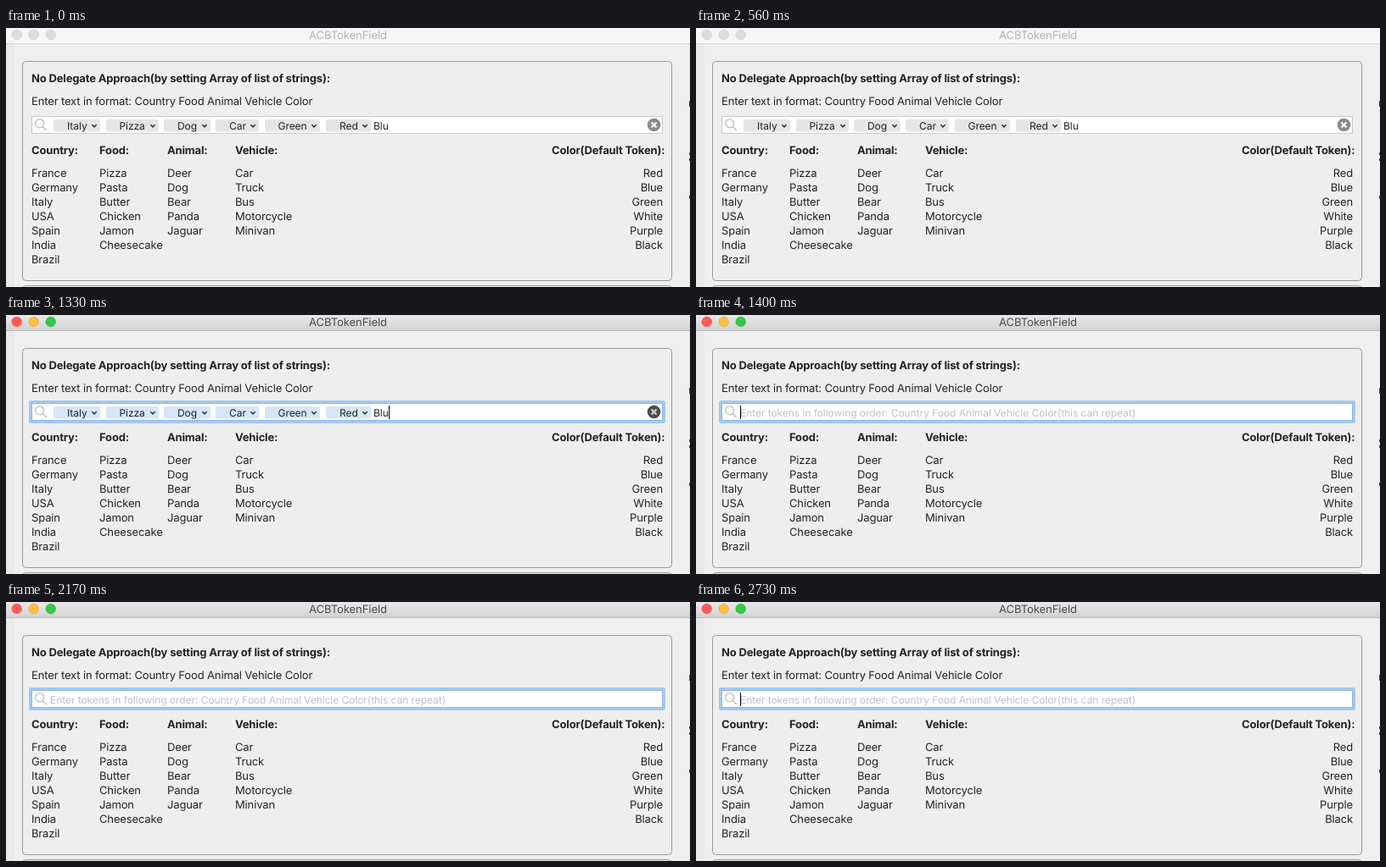
Animation, 806 px wide and 306 px high, one loop 2870 ms. Source, as an HTML page:

```html
<!DOCTYPE html>
<html lang="en">
<head>
<meta charset="utf-8">
<title>Token field</title>
<style>
  html, body { margin: 0; width: 100%; height: 100%; overflow: hidden; background: #ececec; }
  svg { display: block; }
  text {
    font: 13px Inter, Roboto, sans-serif;
    letter-spacing: -.14px;
    fill: #232323;
    text-rendering: geometricPrecision;
    white-space: pre;
  }
  .bold { font-weight: 700; letter-spacing: -.16px; }
  .title { letter-spacing: -.04px; text-anchor: middle; fill: #4a4a4a; }
  .right { text-anchor: end; }
  .small { font-size: 12px; letter-spacing: -.05px; }
  .hint { fill: #c1c1c1; }
  .idle .title { fill: #b3b3b3; }
  .lamp { stroke-width: .6; }
  .chip { fill: #d5e6f7; }
  .chevron { fill: none; stroke: #333; stroke-width: 1.5; }

  /* One loop: focus at 1260 ms, cleared at 1400 ms, then a blinking caret */
  .idle, .focus, .tokens, .empty, .chip, .caret { animation: 2870ms step-end infinite; }
  .idle { animation-name: leave; }
  .focus { animation-name: enter; }
  .tokens { animation-name: clear; }
  .empty { animation-name: reveal; }
  .chip { animation-name: tint; }
  .caret { animation-name: blink; }
  @keyframes leave { 0% { visibility: visible } 43.902%, 100% { visibility: hidden } }
  @keyframes enter { 0% { visibility: hidden } 43.902%, 100% { visibility: visible } }
  @keyframes clear { 0% { opacity: 1 } 48.78%, 100% { opacity: 0 } }
  @keyframes reveal { 0% { opacity: 0 } 48.78%, 100% { opacity: 1 } }
  @keyframes tint { 0% { fill: #e5e5e5 } 43.902%, 100% { fill: #d5e6f7 } }
  @keyframes blink {
    0% { opacity: 1 }
    68.293% { opacity: .4 }
    70.732% { opacity: 0 }
    90.244% { opacity: .25 }
    92.683% { opacity: .65 }
    95.122%, 100% { opacity: 1 }
  }
</style>
</head>
<body>
<svg id="stage" width="806" height="306" viewBox="0 0 806 306">
  <defs>
    <linearGradient id="bar" x2="0" y2="1">
      <stop stop-color="#e8e8e8"/><stop offset="1" stop-color="#d3d3d3"/>
    </linearGradient>
    <path id="cross" d="M-3-3 3 3M3-3-3 3" fill="none" stroke-width="2"/>
  </defs>

  <rect width="806" height="306" fill="#e9e9e9"/>
  <rect x="10" y="19" width="795" height="287" fill="#efefef"/>
  <path d="M805.5 86v7M805.5 147v3M805.5 154v3M805.5 198v4" stroke="#444"/>
  <g fill="#eeeeee" stroke="#989898">
    <rect x="19.5" y="39.5" width="765" height="259" rx="4"/>
    <rect x="19.5" y="304.5" width="765" height="30" rx="4"/>
  </g>

  <g class="idle">
    <rect width="806" height="18" fill="#f6f6f6"/>
    <path d="M0 18.5H806" stroke="#d6d6d6"/>
    <g id="idleLamps"></g>
    <text class="title" x="403" y="13">ACBTokenField</text>
    <rect x="30.5" y="104.5" width="743" height="20" fill="#fff" stroke="#c9c9c9"/>
  </g>
  <g class="focus">
    <rect width="806" height="18" fill="url(#bar)"/>
    <path d="M0 18.5H806" stroke="#b8b8b8"/>
    <g id="lamps"></g>
    <text class="title" x="403" y="13">ACBTokenField</text>
    <rect x="27" y="101" width="750" height="27" rx="2.5" fill="#a3c8f0"/>
    <rect x="30.5" y="104.5" width="743" height="20" fill="#fff" stroke="#8fb8e6"/>
  </g>

  <g fill="none" stroke="#b9b9b9" stroke-width="1.2">
    <circle cx="39.7" cy="112.8" r="5"/>
    <path d="M43.3 116.5 47.8 121"/>
  </g>

  <g class="tokens">
    <g id="chips"></g>
    <text class="small" x="433" y="120">Blu</text>
    <g transform="translate(763.5 114.5)">
      <g class="idle"><circle r="7.8" fill="#8b8b8b"/><use href="#cross" stroke="#fff"/></g>
      <g class="focus"><circle r="7.8" fill="#4c4c4c"/><use href="#cross" stroke="#d8d8d8"/></g>
    </g>
    <path class="focus" d="M451.5 107V123" stroke="#000"/>
  </g>
  <g class="empty">
    <text class="small hint" x="52" y="120">Enter tokens in following order: Country Food Animal Vehicle Color(this can repeat)</text>
    <path class="caret" d="M52.5 107V123" stroke="#000"/>
  </g>

  <text class="bold" x="30" y="64">No Delegate Approach(by setting Array of list of strings):</text>
  <text x="30" y="91">Enter text in format: Country Food Animal Vehicle Color</text>
  <g id="lists"></g>
  <rect x="777" y="136" width="7" height="18" fill="#eeeeee"/>
</svg>
<script>
  const byId = id => document.getElementById(id);
  const label = (x, y, str, cls = "") => `<text class="${cls}" x="${x}" y="${y}">${str}</text>`;

  const lamps = colors => colors.map(([fill, edge], i) =>
    `<circle class="lamp" cx="${12.7 + 20 * i}" cy="8" r="5.8" fill="${fill}" stroke="${edge}"/>`).join("");
  byId("idleLamps").innerHTML = lamps(Array(3).fill(["#dddddd", "#c8c8c8"]));
  byId("lamps").innerHTML = lamps([["#fc5b57", "#df4744"], ["#fdbe41", "#de9f34"], ["#34c84a", "#27aa35"]]);

  // left edge, right edge, text start
  const chips = [
    ["Italy", 56, 111, 72], ["Pizza", 118, 180, 133.5], ["Dog", 186, 241, 202],
    ["Car", 247, 298, 263], ["Green", 305, 370, 320.5], ["Red", 377, 430, 393]
  ];
  byId("chips").innerHTML = chips.map(([name, left, right, x]) =>
    `<rect class="chip" x="${left}" y="108" width="${right - left}" height="14.5" rx="2"/>` +
    label(x, 120, name, "small") +
    `<path class="chevron" d="M${right - 9.7} 114.2l2.7 2.7 2.7-2.7"/>`).join("");

  const lists = [
    [30, "Country:", "France Germany Italy USA Spain India Brazil"],
    [110, "Food:", "Pizza Pasta Butter Chicken Jamon Cheesecake"],
    [190, "Animal:", "Deer Dog Bear Panda Jaguar"],
    [270, "Vehicle:", "Car Truck Bus Motorcycle Minivan"],
    [643, "Color(Default Token):", "Red Blue Green White Purple Black", 774]
  ];
  byId("lists").innerHTML = lists.map(([x, head, words, end]) =>
    label(x, 149, head, "bold") +
    words.split(" ").map((word, i) =>
      label(end || x, 176 + 17 * i, word, end ? "right" : "")).join("")).join("");
</script>
</body>
</html>
```
